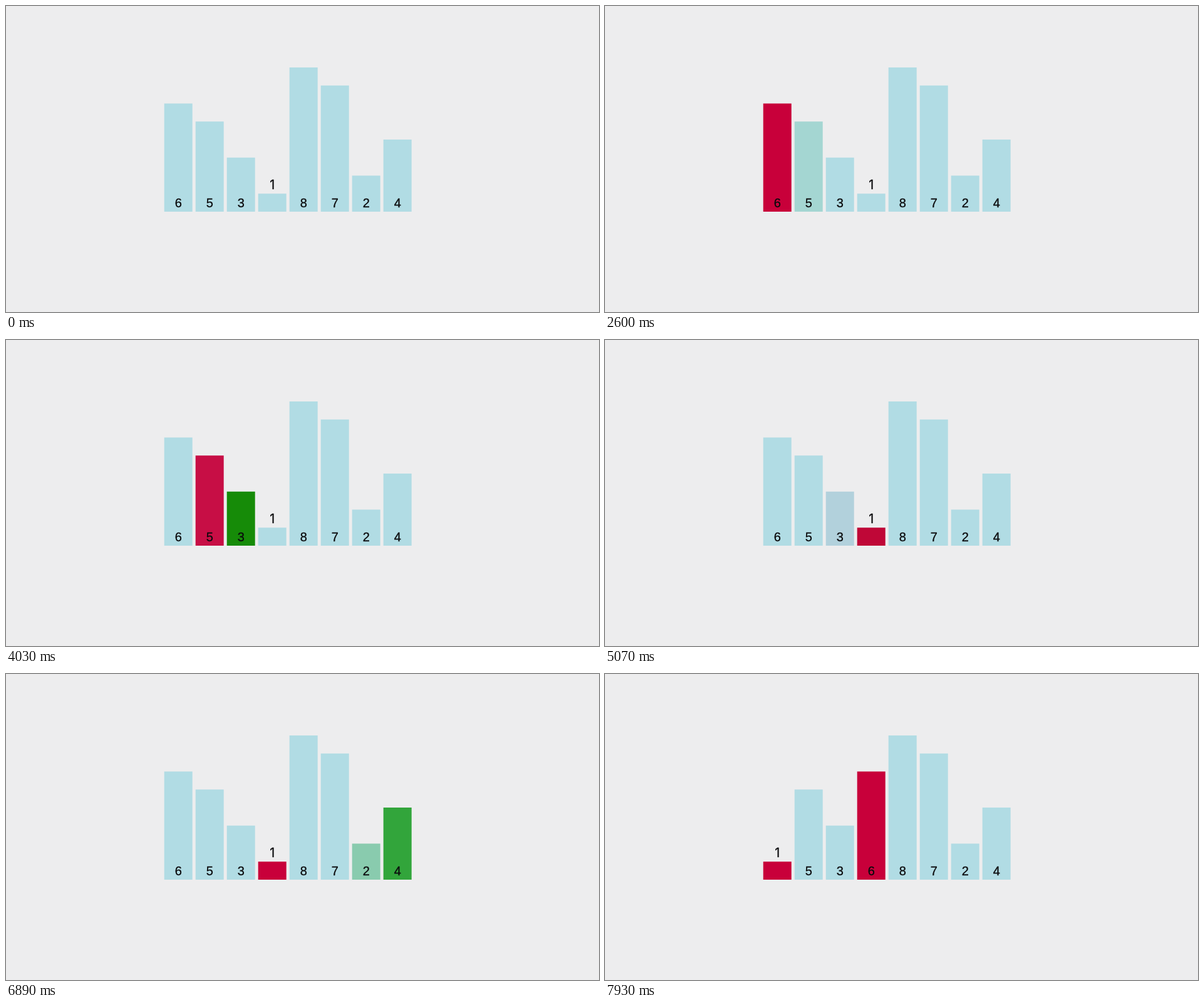
An HTML page with a canvas that plays this animation: 947x488 px, repeating every 8 s.

```html
<!DOCTYPE html>
<html lang="en">
<head>
<meta charset="utf-8">
<title>Selection sort</title>
<style>
  html, body { margin: 0; width: 100%; height: 100%; overflow: hidden; background: #ededee; }
  canvas { display: block; }
</style>
</head>
<body>
<canvas id="stage" width="947" height="488"></canvas>
<script>
const ctx = document.getElementById('stage').getContext('2d');

const LOOP = 8000, TICK = 130, FADE = 250;
const LEFT = 252.7, PITCH = 50, WIDTH = 45, FLOOR = 328, UNIT = 28.75;
const BLUE = [177, 220, 228], RED = [200, 0, 58], GREEN = [10, 148, 5];
const values = [6, 5, 3, 1, 8, 7, 2, 4];
const SWAP_AT = 7668;

// Each step: start time, then the new colour of each bar it touches.
const steps = [
  [1600, { 6: RED }],
  [2532, { 5: GREEN }],
  [3010, { 5: RED, 6: BLUE }],
  [3480, { 3: GREEN }],
  [3967, { 3: RED, 5: BLUE }],
  [4422, { 1: GREEN }],
  [4878, { 1: RED, 3: BLUE }],
  [5343, { 8: GREEN }],
  [5808, { 7: GREEN, 8: BLUE }],
  [6273, { 2: GREEN, 7: BLUE }],
  [6738, { 4: GREEN, 2: BLUE }],
  [7203, { 4: BLUE, 6: RED }]
];

const mix = (a, b, k) => a + (b - a) * k;

// Cubic ease in and out, from 0 at start to 1 after FADE.
function progress(time, start) {
  const p = Math.min(1, Math.max(0, (time - start) / FADE));
  return p < 0.5 ? 4 * p ** 3 : 1 - 4 * (1 - p) ** 3;
}

function colorOf(value, time) {
  let color = BLUE;
  for (const [start, changes] of steps) {
    const next = changes[value];
    if (next) color = color.map((c, i) => mix(c, next[i], progress(time, start)));
  }
  return `rgb(${color.map(Math.round).join(',')})`;
}

function slotOf(value, index, time) {
  const k = progress(time, SWAP_AT);
  if (value === 6) return mix(0, 3, k);
  if (value === 1) return mix(3, 0, k);
  return index;
}

function drawBar(value, index, time) {
  const x = LEFT + slotOf(value, index, time) * PITCH;
  const height = value * UNIT;
  ctx.fillStyle = colorOf(value, time);
  ctx.fillRect(x, FLOOR - height, WIDTH, height);

  // The shortest bar carries its label above; its digit has no foot.
  const short = value === 1;
  ctx.font = short ? '19.5px Inter, sans-serif'
                   : '20px "Liberation Sans", Arial, sans-serif';
  const y = short ? 292 : 320.5;
  ctx.fillStyle = ctx.strokeStyle = '#0b0b0d';
  ctx.fillText(value, x + WIDTH / 2, y);
  ctx.strokeText(value, x + WIDTH / 2, y);
}

function draw(time) {
  ctx.fillStyle = '#ededee';
  ctx.fillRect(0, 0, 947, 488);
  ctx.textAlign = 'center';
  ctx.lineWidth = 0.3;
  values.forEach((value, index) => drawBar(value, index, time));
}

const began = performance.now();
function loop() {
  const time = (performance.now() - began) % LOOP;
  draw(Math.floor(time / TICK) * TICK);
  requestAnimationFrame(loop);
}
loop();
</script>
</body>
</html>
```
